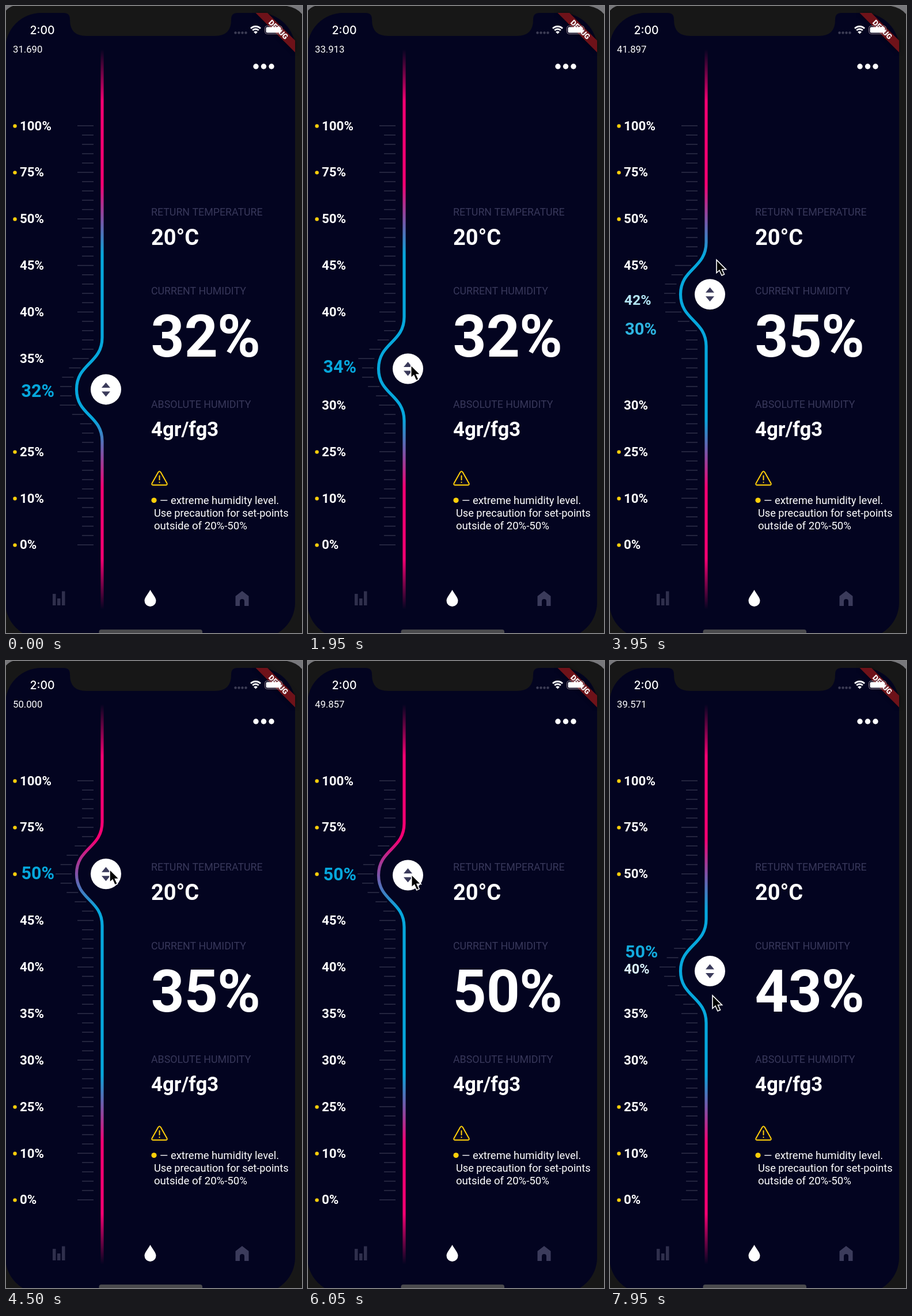
Write an HTML page with a canvas that moves like this. It is 514 px wide and 1089 px high and loops after 8000 ms.

```html
<!DOCTYPE html>
<html lang="en">
<head>
<meta charset="utf-8">
<title>Humidity slider</title>
<style>
  html, body { margin: 0; width: 100%; height: 100%; overflow: hidden; background: #171717; }
  canvas { display: block; }
</style>
</head>
<body>
<canvas id="stage" width="514" height="1089"></canvas>
<script>
const ctx = document.getElementById('stage').getContext('2d');
const LOOP = 8000, TICK = 50;
const LEVELS = [100, 75, 50, 45, 40, 35, 30, 25, 10, 0];
const TOP = 208, STEP = 80.87;
const NAVY = '#030420', DIM = '#38385a', ICON = '#3b3b5b', BEZEL = '#171717', YELLOW = '#ffcf0a';
const PINK = '245,0,114', BLUE = '6,167,220';

const ease = {
  in: p => p * p,
  out: p => 1 - (1 - p) ** 2,
  both: p => p * p * (3 - 2 * p)
};

// Knob position in scale steps from the top: [time, position, easing into it]
const KNOB = [
  [0, 5.662], [1000, 5.662], [1300, 5.7296, 'both'], [2300, 5.0166, 'both'], [3750, 5.0166],
  [3950, 3.6206, 'in'], [4182, 2, 'out'], [6000, 2], [6580, 3.3578, 'both'],
  [7875, 3.3578], [7950, 4.0858, 'in'], [8000, 4.6]
];
const POINTER_Y = [
  [700, 640], [950, 671, 'out'], [1300, 661, 'both'], [2250, 612, 'both'], [3700, 612],
  [3950, 441, 'in'], [4140, 362, 'out'], [5950, 362], [6550, 482, 'both'],
  [7820, 482], [7950, 581, 'in'], [8000, 600]
];
const POINTER_X = [
  [700, 520], [950, 180, 'out'], [1300, 180], [2300, 178], [3700, 178], [3950, 185, 'both'],
  [4140, 180, 'both'], [5950, 180], [6550, 178], [8000, 178]
];
const READINGS = [[-999, '32'], [2950, '35'], [5167, '50'], [6950, '43']];

function track(keys, t) {
  const i = keys.findIndex(k => k[0] > t);
  if (i < 0) return keys[keys.length - 1][1];
  if (i === 0) return keys[0][1];
  const [t0, a] = keys[i - 1], [t1, b, kind] = keys[i];
  const p = (t - t0) / (t1 - t0);
  return a + (b - a) * (kind ? ease[kind](p) : p);
}

function valueAt(pos) {
  const i = Math.min(Math.floor(pos), LEVELS.length - 2);
  return LEVELS[i] + (LEVELS[i + 1] - LEVELS[i]) * (pos - i);
}

function text(str, x, y, size, color = '#fff', weight = 400, family = 'Roboto') {
  ctx.font = `${weight} ${size}px ${family}, sans-serif`;
  ctx.fillStyle = color;
  ctx.fillText(str, x, y);
}

function dot(x, y, r, color) {
  ctx.fillStyle = color;
  ctx.beginPath();
  ctx.arc(x, y, r, 0, 7);
  ctx.fill();
}

function box(x, y, w, h, r, color) {
  ctx.fillStyle = color;
  ctx.beginPath();
  ctx.roundRect(x, y, w, h, r);
  ctx.fill();
}

function shape(d, fill, stroke, width) {
  const path = new Path2D(d);
  if (fill) { ctx.fillStyle = fill; ctx.fill(path); }
  if (stroke) { ctx.strokeStyle = stroke; ctx.lineWidth = width; ctx.stroke(path); }
}

const trackPaint = ctx.createLinearGradient(0, 75, 0, 1048);
for (const [y, rgb, alpha] of [
  [75, PINK, 0], [165, PINK, 1], [310, PINK, 1], [432, BLUE, 1],
  [718, BLUE, 1], [835, PINK, 1], [960, PINK, 1], [1048, PINK, 0]
]) trackPaint.addColorStop((y - 75) / 973, `rgba(${rgb},${alpha})`);

function drawScale(knobY) {
  ctx.strokeStyle = '#2f3049';
  ctx.lineWidth = 1.5;
  for (let i = 0; i <= 45; i++) {
    const y = TOP + i * STEP / 5;
    const d = Math.min(Math.abs(y - knobY), 90);
    const bump = Math.cos(d * Math.PI / 180) ** 2;
    const shift = Math.max(0, Math.min(38, 51 * bump - 9.7));
    ctx.beginPath();
    ctx.moveTo((i % 5 ? 132 : 124) - shift, y);
    ctx.lineTo(152 - shift, y);
    ctx.stroke();
  }
  const k = knobY;
  shape(`M167 75V${k - 90}C167 ${k - 45} 122.5 ${k - 45} 122.5 ${k}S167 ${k + 45} 167 ${k + 90}V1048`,
    null, trackPaint, 5.2);
  dot(173.5, k, 26.5, '#fff');
  shape(`M166 ${k - 3}h15l-7.5 -9zM166 ${k + 3.5}h15l-7.5 9z`, ICON);
}

function drawLabels(t, pos, knobY) {
  // How long each level has been the nearest one during the last 200 ms
  const nearness = LEVELS.map(() => 0);
  for (let k = 0; k < 40; k++) nearness[Math.round(track(KNOB, Math.max(0, t - k * 5)))] += 1 / 40;
  const current = Math.round(pos);

  LEVELS.forEach((level, i) => {
    const a = Math.min(1, nearness[i]);
    const y = TOP + i * STEP;
    const active = i === current;
    const pull = 0.87 * (active ? 1 - (1 - a) ** 3 : a ** 1.3);
    const tint = active ? a ** 1.3 : 1 - (1 - a) ** 2;
    let shown = level;
    if (active) shown = Math.round(valueAt(pos));
    else if (a > 0) shown = LEVELS[i + Math.sign(i - current)] ?? level;

    if (level >= 50 || level <= 25) dot(15.5, y + 0.5, 3.2, YELLOW);
    const size = 22.3 + 8.2 * tint;
    const rgb = BLUE.split(',').map(c => 255 + (c - 255) * tint);
    text(shown + '%', 24 + 2.5 * tint, y + (knobY - y) * pull + size * 0.34 - tint, size, `rgb(${rgb})`, 600);
  });
}

function drawReading(t) {
  const i = READINGS.findLastIndex(r => r[0] <= t);
  const p = Math.min(1, (t - READINGS[i][0]) / 300);
  const digits = (str, dy, alpha) => text(str, 251.5, 609 + dy, 101.5, `rgba(255,255,255,${alpha})`, 600);
  if (p < 1) digits(READINGS[i - 1][1], -61 * p, 1 - p);
  digits(READINGS[i][1], 61 * (1 - p), p);
  text('%', 367, 609, 101.5, '#fff', 600);
}

function drawInfo() {
  text('RETURN TEMPERATURE', 252, 364, 17.8, DIM);
  text('20°C', 252, 414.5, 38, '#fff', 600);
  text('CURRENT HUMIDITY', 252, 501, 17.8, DIM);
  text('ABSOLUTE HUMIDITY', 252, 698, 17.8, DIM);
  text('4gr/fg3', 252, 747, 34.7, '#fff', 600);
  ctx.lineJoin = ctx.lineCap = 'round';
  shape('M264.5 809.5q2 -2.5 4 0L279.5 829q1 3 -2 3H255.5q-3 0 -2 -3zM266.5 816v7M266.5 827v.5', null, YELLOW, 2);
  ctx.lineJoin = 'miter';
  ctx.lineCap = 'butt';
  dot(257, 858.5, 4.6, YELLOW);
  text('— extreme humidity level.', 267, 865, 18.4);
  text('Use precaution for set-points', 257, 887, 18.2);
  text('outside of 20%-50%', 257, 909, 18.6);
  for (const x of [434, 447.5, 461]) dot(x, 105, 4.7, '#fff');
}

function drawNav() {
  ctx.fillStyle = '#2f2f4c';
  for (const [x, y] of [[81, 1021], [89, 1029], [97, 1016.5]]) ctx.fillRect(x, y, 5.5, 1041 - y);
  shape('M250.5 1014C254 1021 260.5 1027 260.5 1033a10 10 0 0 1 -20 0C240.5 1027 247 1021 250.5 1014z', '#fff');
  shape('M410 1016L421.5 1025V1042H414V1034a4 4 0 0 0 -8 0V1042H398.5V1025z', ICON);
  box(161.5, 1083, 179.5, 10, 4, '#4a4a4d');
}

function drawBanner() {
  ctx.save();
  ctx.shadowColor = 'rgba(0,0,0,.5)';
  ctx.shadowBlur = 7;
  shape('M433.5 12H454L502 60V80.5z', '#6e1219');
  ctx.shadowBlur = 0;
  ctx.translate(473, 41);
  ctx.rotate(Math.PI / 4);
  ctx.textAlign = 'center';
  text('DEBUG', 0, 4.5, 13, '#fff', 900);
  ctx.restore();
}

function drawStatus() {
  text('2:00', 41.5, 49, 19.5, '#fff', 500, 'Inter');
  for (let i = 0; i < 4; i++) dot(398.5 + i * 6, 46.5, 2.2, '#3d3d55');
  ctx.strokeStyle = '#fff';
  ctx.lineWidth = 2.8;
  for (const r of [7.5, 12]) {
    ctx.beginPath();
    ctx.arc(433.5, 47.5, r, -Math.PI * 0.75, -Math.PI * 0.25);
    ctx.stroke();
  }
  shape('M433.5 48.5l-3.5 -3.5q3.5 -3 7 0z', '#fff');
  ctx.strokeStyle = '#8d7d87';
  ctx.lineWidth = 1;
  ctx.beginPath();
  ctx.roundRect(449.5, 34.5, 30, 14, 4);
  ctx.stroke();
  box(451.5, 36.5, 26, 10, 2.5, '#fff');
}

function drawPhone() {
  ctx.fillStyle = BEZEL;
  ctx.fillRect(0, 0, 514, 1089);
  shape('M0 0H12Q5 2 0 8zM488 0H514V14Q505 3 488 0z', '#77777b');
  box(-1, 12, 503, 1086, 62, NAVY);
}

function drawNotch() {
  shape('M100 11H402V12Q391 12 391 23V24Q391 52 363 52H139Q111 52 111 24V23Q111 12 100 12z', BEZEL);
}

function drawPointer(t) {
  if (t < 700) return;
  ctx.save();
  ctx.translate(track(POINTER_X, t), track(POINTER_Y, t));
  shape('M0 0V22.5L5 18L9 27L13.5 25L9.5 16.5H16.5z', '#000', '#fff', 1.6);
  ctx.restore();
}

function frame() {
  // The picture advances at 20 steps per second
  const t = Math.floor(performance.now() % LOOP / TICK) * TICK;
  const pos = track(KNOB, t);
  const knobY = TOP + pos * STEP;
  drawPhone();
  drawScale(knobY);
  drawLabels(t, pos, knobY);
  drawInfo();
  drawReading(t);
  drawNav();
  text(valueAt(pos).toFixed(3), 12, 81, 16.7);
  drawBanner();
  drawStatus();
  drawNotch();
  drawPointer(t);
  requestAnimationFrame(frame);
}
frame();
</script>
</body>
</html>
```
